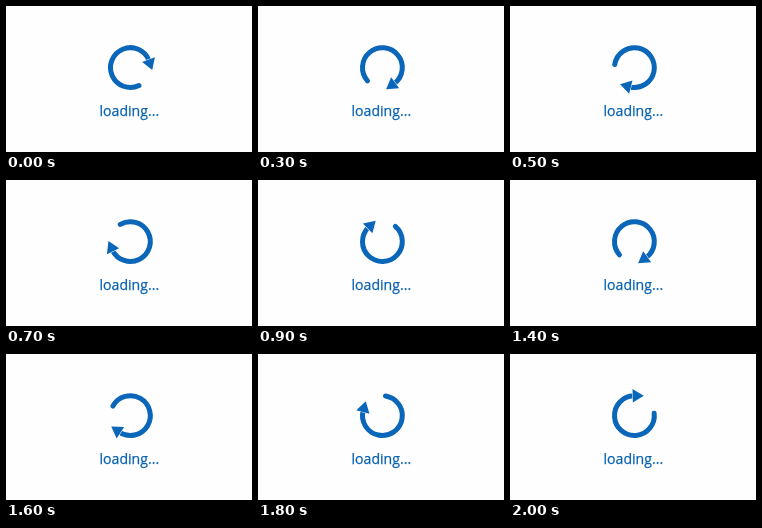
An HTML page for the animation above (2.1 s loop, 246 px wide and 146 px high).

```html
<!DOCTYPE html>
<html lang="en">
<head>
<meta charset="utf-8">
<title>Loading</title>
<style>
  html, body { margin: 0; width: 100%; height: 100%; overflow: hidden; background: #fefefe; }
  svg { display: block; width: 246px; height: 146px; }
  text { font: 14.1px "Open Sans", "Noto Sans", sans-serif; fill: #0862b2; stroke: #0862b2; stroke-width: .25; }
</style>
</head>
<body>
<svg viewBox="0 0 246 146">
  <g id="spinner">
    <path id="arc" fill="none" stroke="#0a66b8" stroke-width="5" stroke-linecap="round"/>
    <path d="M-4.2-26.3L7.6-20.6L-2.7-12.8Z" fill="#0a66b8" stroke="#fefefe" stroke-width="1" paint-order="stroke"/>
  </g>
  <text x="93.5" y="109.6">loading...</text>
</svg>
<script>
  const LOOP = 2100, STEP = 100;
  const CENTER = [124.4, 61.6], RADIUS = 19.9;
  const TAIL = 78.5, NECK = 353;

  // [time in ms, clockwise angle of the arrowhead from the top]
  const poses = [[0, 76], [300, 150], [700, 251], [1100, 393], [1400, 510], [1800, 650.5], [2000, 725]];

  const spinner = document.getElementById("spinner");

  function point(degrees) {
    const a = degrees * Math.PI / 180;
    return `${RADIUS * Math.sin(a)} ${-RADIUS * Math.cos(a)}`;
  }

  function angleAt(time) {
    const next = poses.findIndex(([t]) => t > time);
    if (next < 0) return poses[poses.length - 1][1];
    const [t0, a0] = poses[next - 1];
    const [t1, a1] = poses[next];
    return a0 + (a1 - a0) * (time - t0) / (t1 - t0);
  }

  function draw(time) {
    const stepped = Math.floor((time % LOOP) / STEP) * STEP;
    spinner.setAttribute("transform", `translate(${CENTER}) rotate(${angleAt(stepped)})`);
  }

  document.getElementById("arc")
    .setAttribute("d", `M${point(TAIL)}A${RADIUS} ${RADIUS} 0 1 1 ${point(NECK)}`);

  const start = performance.now();
  function tick() {
    draw(performance.now() - start);
    requestAnimationFrame(tick);
  }
  tick();
</script>
</body>
</html>
```
